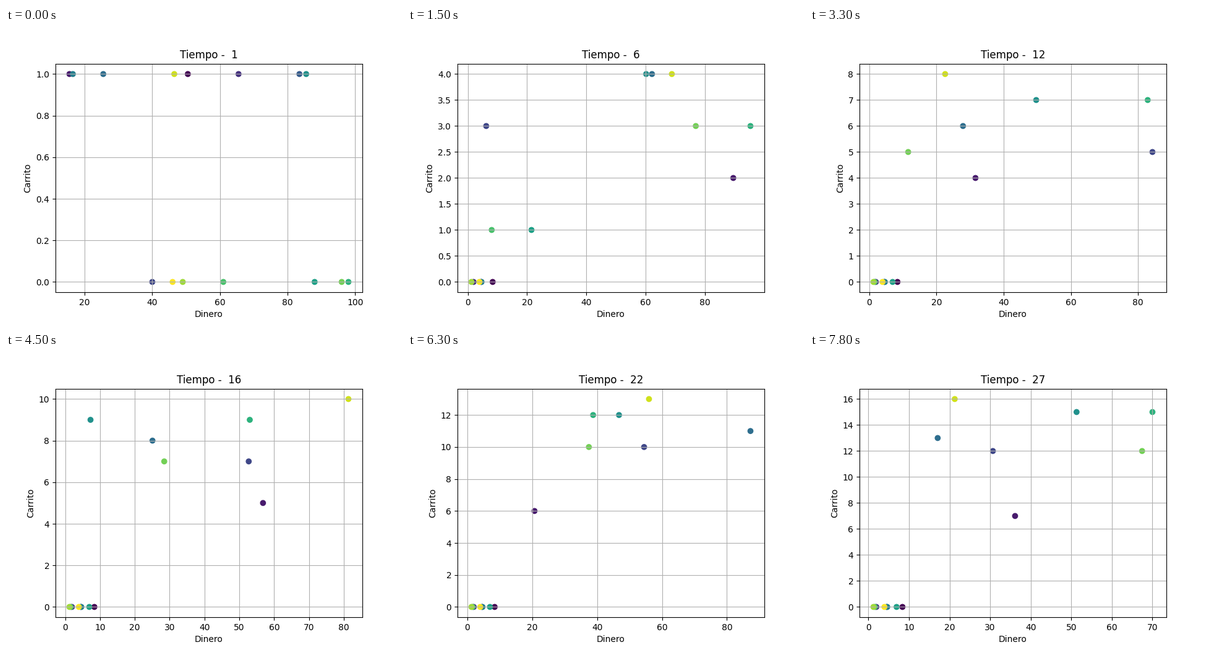
Animation of 640 by 480 pixels, one loop 8000 ms. Source, as a matplotlib script:

```python
import matplotlib.pyplot as plt
import numpy as np
from matplotlib.animation import FuncAnimation

STEPS = 27
FRAMES_PER_STEP = 3

# Fifteen shoppers in color order: even ones go broke, odd ones keep buying.
START_MONEY = [50.5, 15.5, 65.5, 40, 83.5, 25.5, 16.5, 85.5,
               88, 98, 61, 96, 49, 46.5, 46]
FIRST_BUYERS = [0, 1, 2, 4, 5, 6, 7, 13]
LATE_LEAVERS = [8, 10]
REST_MONEY = [8.4, 1.95, 4.5, 4.65, 6.95, 1.6, 1.25, 3.95]
BUYING_PACE = [0.22, 0.46, 0.45, 0.53, 0.56, 0.44, 0.566]

# Money of the richest shopper over time.
PEAK_STEPS = [0, 5, 11, 15, 18, 23, 26]
PEAK_MONEY = [98, 95.27, 84.3, 81.3, 87.6, 87, 70]

steps = np.arange(STEPS)
shoppers = np.arange(len(START_MONEY))
started = np.isin(shoppers, FIRST_BUYERS)


def broke_shopper(start, rest, bought_first, leave_step):
    """Money decays to its rest value; the cart empties on leaving."""
    progress = np.minimum(steps / leave_step, 1)
    money = start * (rest / start) ** progress
    cart = np.where(steps == 0, bought_first, steps < leave_step)
    return money, cart


def active_money(count):
    """Fresh random money every step, scaled to the richest shopper."""
    draws = np.random.default_rng(7).uniform(0.05, 1, (count, STEPS))
    return draws / draws.max(axis=0) * np.interp(steps, PEAK_STEPS, PEAK_MONEY)


def simulate():
    money = np.empty((len(shoppers), STEPS))
    cart = np.empty_like(money)
    for i, rest in zip(shoppers[::2], REST_MONEY):
        leave_step = 9 if i in LATE_LEAVERS else 4
        money[i], cart[i] = broke_shopper(START_MONEY[i], rest,
                                          started[i], leave_step)
    money[1::2] = active_money(len(BUYING_PACE))
    money[:, 0] = START_MONEY
    first = 0.4 + 0.9 * started[1::2, None]
    cart[1::2] = np.round(first + np.outer(BUYING_PACE, steps))
    return money, cart


money, cart = simulate()
fig, ax = plt.subplots(figsize=(6.4, 4.8), dpi=100)


def draw(frame):
    step = frame // FRAMES_PER_STEP
    ax.clear()
    ax.scatter(money[:, step], cart[:, step], c=shoppers, cmap="viridis")
    ax.set_title(f"Tiempo -  {step + 1}")
    ax.set_xlabel("Dinero")
    ax.set_ylabel("Carrito")
    ax.grid(True)


# The final step is held for two ticks instead of three.
animation = FuncAnimation(fig, draw, frames=STEPS * FRAMES_PER_STEP - 1,
                          interval=100, repeat=True, repeat_delay=0)
plt.show()
```
